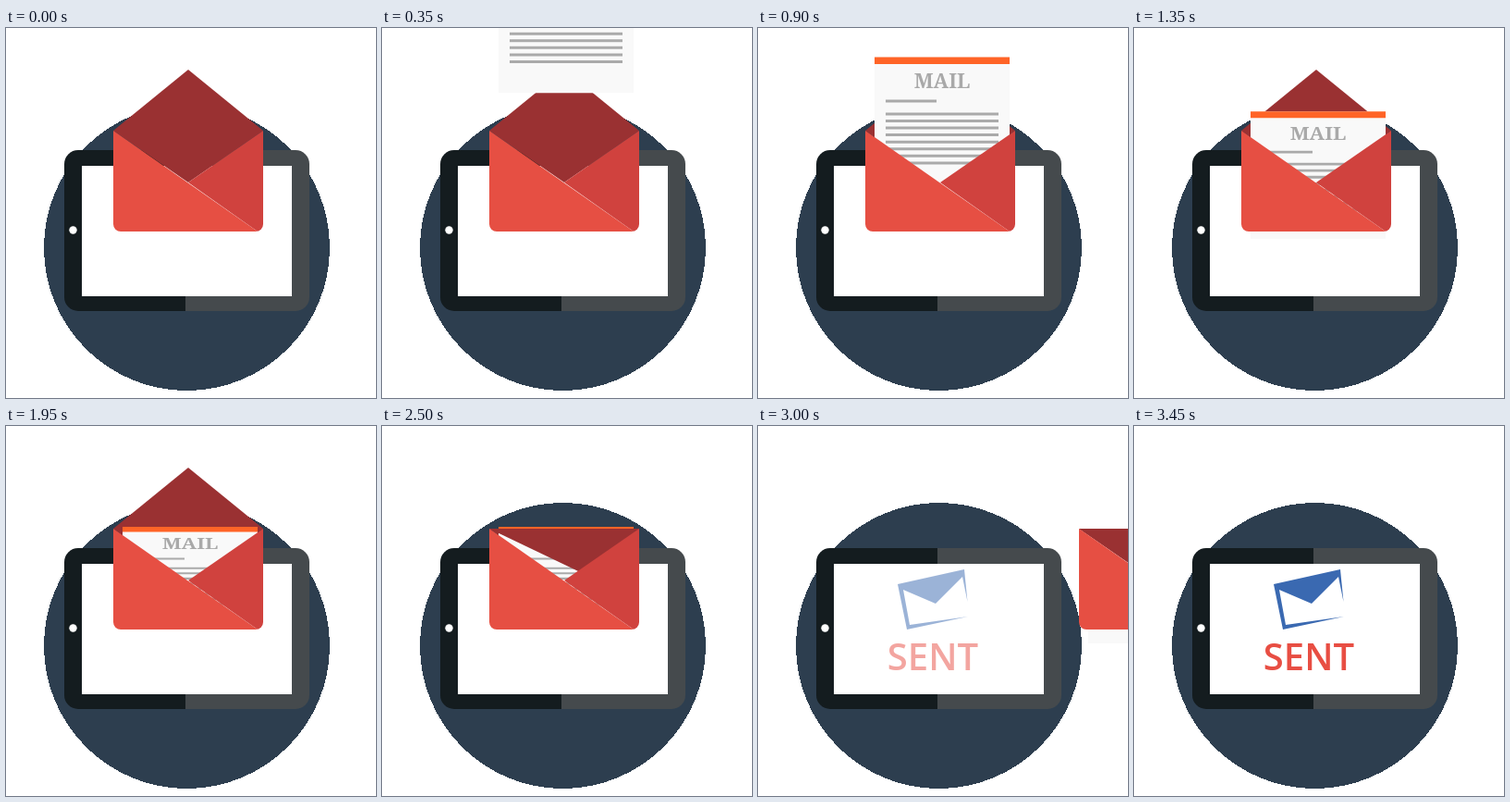
Recreate the animation shown at these times as an HTML page. Size 400 by 400 pixels, loop 8 s.

```html
<!DOCTYPE html>
<html lang="en">
<head>
<meta charset="utf-8">
<title>Mail sent</title>
<style>
  html, body { margin: 0; width: 100%; height: 100%; overflow: hidden; background: #fff; }
  svg { display: block; width: 100%; height: 100%; }
  .mail { font: 900 22px "Noto Serif", serif; fill: #a9a9a9; }
  .sent { font: 600 40px "Open Sans", sans-serif; fill: #e84e43; }
</style>
</head>
<body>
<svg viewBox="0 0 400 400">
  <defs>
    <clipPath id="body"><path d="M116 111H278V212a8 8 0 0 1-8 8H124a8 8 0 0 1-8-8Z"/></clipPath>
    <clipPath id="tablet"><rect x="63" y="132" width="265" height="174" rx="15"/></clipPath>
  </defs>

  <circle cx="195.5" cy="237.5" r="154.5" fill="#2d3e4f" shape-rendering="crispEdges"/>
  <g clip-path="url(#tablet)">
    <path d="M63 132H194V306H63Z" fill="#141c1f"/>
    <path d="M194 132H328V306H194Z" fill="#454a4d"/>
  </g>
  <path d="M82 149H309V290H82Z" fill="#fff"/>
  <circle cx="72.5" cy="218.5" r="4.2" fill="#fff"/>

  <g id="done" opacity="0">
    <path fill="#3a69b1" d="M151 171 223 155 226.5 190 221 163 192 192 157 177 164 215 227 206 161 220Z"/>
    <text class="sent" x="189" y="264" text-anchor="middle">SENT</text>
  </g>

  <g id="envelope">
    <path id="strip" d="M126 210H272V235H126Z" fill="#f9f9f9"/>
    <path d="M116 111H278L197 167Z" fill="#9a3132"/>
    <path id="flapBack" fill="#9a3132"/>
    <g id="letter">
      <path d="M126 0H272V148H126Z" fill="#f9f9f9"/>
      <path d="M126 0H272V7.5H126Z" fill="#ff6427"/>
      <text class="mail" x="199" y="33.5" text-anchor="middle">MAIL</text>
      <path id="lines" stroke="#aaa" stroke-width="3"/>
    </g>
    <path id="flapFront" fill="#9a3132"/>
    <g clip-path="url(#body)">
      <path d="M116 111 272 220H116Z" fill="#e64f43"/>
      <path d="M278 111 197 167 272 220H278Z" fill="#d0423e"/>
    </g>
  </g>
</svg>
<script>
  const LOOP = 8000, STEP = 50, PAPER = 148;
  const el = id => document.getElementById(id);
  const clamp = v => Math.min(1, Math.max(0, v));
  const progress = (t, from, to) => clamp((t - from) / (to - from));
  const easeInOut = p => (1 - Math.cos(Math.PI * p)) / 2;

  // Linear interpolation through [time, value] pairs
  function track(keys, t) {
    const i = keys.findIndex(k => k[0] > t);
    if (i < 0) return keys[keys.length - 1][1];
    if (i === 0) return keys[0][1];
    const [t0, v0] = keys[i - 1], [t1, v1] = keys[i];
    return v0 + (v1 - v0) * (t - t0) / (t1 - t0);
  }

  const letterCenter = [[0, -75], [600, 47], [850, 98], [1100, 136], [1350, 159], [1700, 163]];
  const letterScale = [[1220, 1], [1350, 0.93], [1700, 0.73]];

  let rules = "M138 47.3H193";
  for (let i = 0; i < 8; i++) rules += `M138 ${61.3 + i * 7.57}H260`;
  el("lines").setAttribute("d", rules);

  function draw(t) {
    const scale = track(letterScale, t);
    const top = track(letterCenter, t) - scale * PAPER / 2;
    const closed = t >= 2550;
    el("letter").setAttribute("transform", `translate(0 ${top}) scale(1 ${scale})`);
    el("letter").style.display = closed ? "none" : "";
    el("strip").style.display = closed ? "" : "none";

    const fold = easeInOut(progress(t, 1950, 2510));
    const tipX = closed ? 197 : 197 + 34 * fold;
    const tipY = 45 + 121 * fold;
    const flap = `M116 111H278L${tipX} ${tipY}Z`;
    const inFront = tipY > 111;
    el("flapBack").setAttribute("d", inFront ? "" : flap);
    el("flapFront").setAttribute("d", inFront ? flap : "");

    const leave = progress(t, 2550, 3450);
    el("envelope").setAttribute("transform", `translate(${462 * leave} 0)`);
    el("done").setAttribute("opacity", leave);
  }

  const start = performance.now();
  function frame() {
    const t = (performance.now() - start) % LOOP;
    draw(Math.floor(t / STEP) * STEP);
    requestAnimationFrame(frame);
  }
  frame();
</script>
</body>
</html>
```
